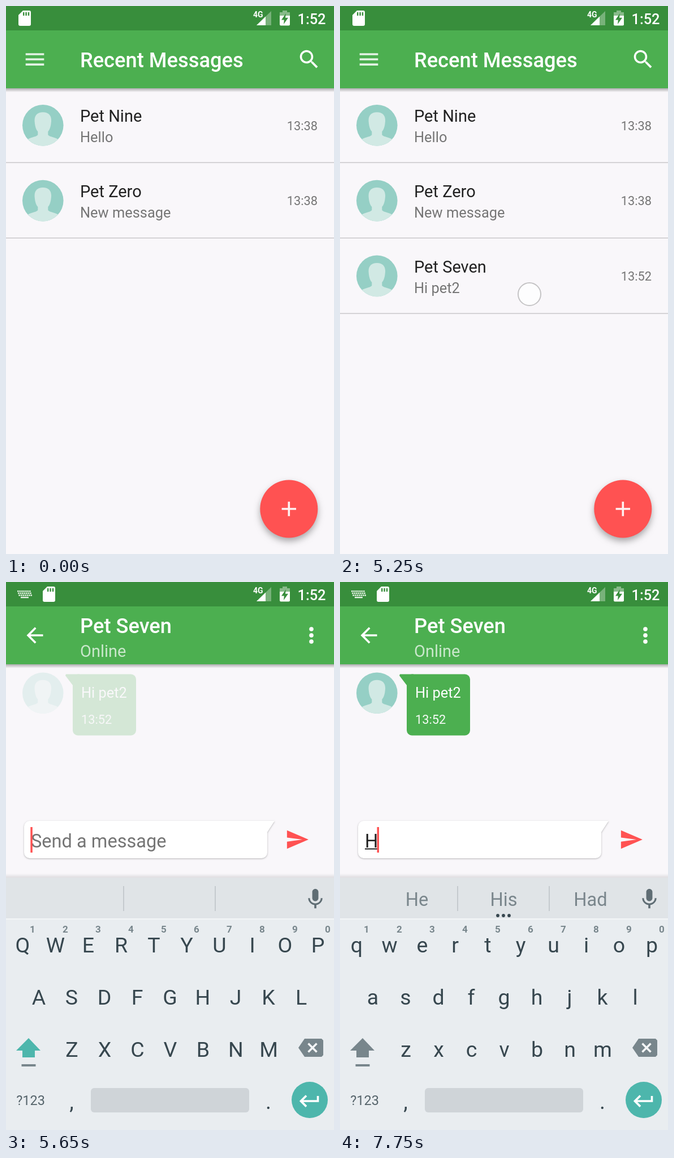
Recreate the animation shown at these times as an HTML page with a canvas. Size 580 by 966 pixels, loop 8000 ms.

```html
<!DOCTYPE html>
<html lang="en">
<head>
<meta charset="utf-8">
<title>Messages</title>
<style>
html, body { margin: 0; width: 100%; height: 100%; overflow: hidden; background: #f9f7fa; }
canvas { display: block; width: 580px; height: 966px; }
</style>
</head>
<body>
<canvas id="stage" width="580" height="966"></canvas>
<script>
const W = 580, H = 966, LOOP = 8000, STEP = 50;
const DP = 1.8125;
const BG = '#f9f7fa', GREEN = '#4caf50', DARK = '#388e3c', RED = '#ff5252', TEAL = '#4db6ac';
const KEY = '#37474f', MUTED = '#78868c';

const ICONS = {
  menu: 'M3 18h18v-2H3v2zm0-5h18v-2H3v2zm0-7v2h18V6H3z',
  search: 'M15.5 14h-.79l-.28-.27C15.41 12.59 16 11.11 16 9.5 16 5.91 13.09 3 9.5 3S3 5.91 3 9.5 5.91 16 9.5 16c1.61 0 3.09-.59 4.23-1.57l.27.28v.79l5 4.99L20.49 19l-4.99-5zm-6 0C7.01 14 5 11.99 5 9.5S7.01 5 9.5 5 14 7.01 14 9.5 11.99 14 9.5 14z',
  back: 'M20 11H7.83l5.59-5.59L12 4l-8 8 8 8 1.41-1.41L7.83 13H20v-2z',
  add: 'M19 13h-6v6h-2v-6H5v-2h6V5h2v6h6v2z',
  send: 'M2.01 21L23 12 2.01 3 2 10l15 2-15 2z',
  mic: 'M12 14c1.66 0 3-1.34 3-3V5c0-1.66-1.34-3-3-3S9 3.34 9 5v6c0 1.66 1.34 3 3 3zm5.3-3c0 3-2.54 5.1-5.3 5.1S6.7 14 6.7 11H5c0 3.41 2.72 6.23 6 6.72V21h2v-3.28c3.28-.48 6-3.3 6-6.72h-1.7z',
  enter: 'M19 7v4H5.83l3.58-3.59L8 6l-6 6 6 6 1.41-1.41L5.83 13H21V7z'
};

const rows = [
  { name: 'Pet Nine', text: 'Hello', time: '13:38' },
  { name: 'Pet Zero', text: 'New message', time: '13:38' },
  { name: 'Pet Seven', text: 'Hi pet2', time: '13:52' }
];

const screen = document.getElementById('stage').getContext('2d');
let g = screen;

const clamp = v => Math.max(0, Math.min(1, v));
const progress = (t, start, length) => clamp((t - start) / length);
const decelerate = (p, power) => 1 - Math.pow(1 - p, power);
const smooth = p => 0.5 - 0.5 * Math.cos(Math.PI * p);

function rect(x, y, w, h, color) {
  g.fillStyle = color;
  g.fillRect(x, y, w, h);
}

function round(x, y, w, h, r, color) {
  g.fillStyle = color;
  g.beginPath();
  g.roundRect(x, y, w, h, r);
  g.fill();
}

function disc(x, y, r, color) {
  g.fillStyle = color;
  g.beginPath();
  g.arc(x, y, r, 0, 7);
  g.fill();
}

function poly(color, ...pts) {
  g.fillStyle = color;
  g.beginPath();
  for (let i = 0; i < pts.length; i += 2) g.lineTo(pts[i], pts[i + 1]);
  g.closePath();
  g.fill();
}

function text(str, x, y, size, color, weight = 400, align = 'left') {
  g.font = `${weight} ${size}px Roboto, sans-serif`;
  g.fillStyle = color;
  g.textAlign = align;
  g.fillText(str, x, y);
}

// Icons live on a 24-unit grid; cx, cy is the grid centre.
function icon(name, cx, cy, color) {
  g.save();
  g.translate(cx - 12 * DP, cy - 12 * DP);
  g.scale(DP, DP);
  g.fillStyle = color;
  g.fill(new Path2D(ICONS[name]));
  g.restore();
}

function shadow(y, h, strength, up) {
  const fill = g.createLinearGradient(0, up ? y + h : y, 0, up ? y : y + h);
  fill.addColorStop(0, `rgba(0,0,0,${strength})`);
  fill.addColorStop(1, 'rgba(0,0,0,0)');
  rect(0, y, W, h, fill);
}

// Draws a group as one layer with shared opacity and vertical shift.
const spare = document.createElement('canvas').getContext('2d');
const spareInner = document.createElement('canvas').getContext('2d');
for (const c of [spare, spareInner]) {
  c.canvas.width = W;
  c.canvas.height = H;
}
function layer(alpha, dy, draw) {
  if (alpha <= 0) return;
  const parent = g;
  g = parent === screen ? spare : spareInner;
  g.clearRect(0, 0, W, H);
  draw();
  const done = g.canvas;
  g = parent;
  g.globalAlpha = alpha;
  g.drawImage(done, 0, dy);
  g.globalAlpha = 1;
}

function avatar(cx, cy) {
  g.save();
  g.translate(cx, cy);
  disc(0, 0, 36.3, '#95cfc5');
  g.beginPath();
  g.arc(0, 0, 36.3, 0, 7);
  g.clip();
  g.fillStyle = '#d1e9e4';
  g.beginPath();
  g.moveTo(0, -23);
  g.bezierCurveTo(11, -23, 16, -16, 14.5, -5);
  g.bezierCurveTo(14, 2, 12, 8, 9, 11);
  g.lineTo(9, 17);
  g.bezierCurveTo(12, 21, 24, 21, 30, 27);
  g.lineTo(30, 40);
  g.lineTo(-30, 40);
  g.lineTo(-30, 27);
  g.bezierCurveTo(-24, 21, -12, 21, -9, 17);
  g.lineTo(-9, 11);
  g.bezierCurveTo(-12, 8, -14, 2, -14.5, -5);
  g.bezierCurveTo(-16, -16, -11, -23, 0, -23);
  g.fill();
  g.restore();
}

function bars() {
  shadow(145, 7, 0.3);
  rect(0, 0, W, 43, DARK);
  rect(0, 43, W, 102, GREEN);
}

function row(i) {
  const { name, text: line, time } = rows[i], y = i * 132.8;
  avatar(65.3, 210.3 + y);
  text(name, 131, 204 + y, 29, '#212121');
  text(line, 131, 240 + y, 25.4, '#757575');
  text(time, 551, 218.5 + y, 21.75, '#757575', 400, 'right');
}

function listScene(t) {
  rect(0, 0, W, H, BG);
  bars();
  icon('menu', 51, 94, 'rgba(255,255,255,.85)');
  text('Recent Messages', 131, 108, 36.25, '#fff', 500);
  icon('search', 536, 94, '#fff');
  const shown = t < 1900 ? 2 : 3;
  for (let i = 0; i < shown; i++) {
    rect(0, Math.round(275.3 + i * 132.8), W, 2, '#d5d3d6');
    if (i < 2) row(i);
  }
  layer(smooth(progress(t, 1900, 120)), 0, () => row(2));

  g.save();
  g.shadowColor = 'rgba(0,0,0,.32)';
  g.shadowBlur = 12;
  g.shadowOffsetY = 6;
  disc(500.3, 886.5, 51, RED);
  g.restore();
  icon('add', 500.3, 886.5, 'rgba(255,255,255,.92)');

  if (t >= 5150) {
    disc(335, 508, 20, 'rgba(255,255,255,.75)');
    g.strokeStyle = 'rgba(0,0,0,.22)';
    g.lineWidth = 2;
    g.stroke();
  }
}

function bubble() {
  avatar(65.3, 195.7);
  round(118, 162.5, 112, 108, 9, GREEN);
  poly(GREEN, 106, 162.5, 130, 162.5, 130, 186, 118, 186, 118, 182, 105, 165);
  text('Hi pet2', 133, 204, 25.4, '#fff');
  text('13:52', 133, 250, 21.75, 'rgba(255,255,255,.95)');
}

function inputShape() {
  g.beginPath();
  g.moveTo(42, 421);
  g.lineTo(475, 421);
  g.lineTo(462, 441);
  g.arcTo(462, 487, 452, 487, 10);
  g.arcTo(32, 487, 32, 477, 10);
  g.arcTo(32, 421, 42, 421, 10);
  g.closePath();
}

function inputBox(t) {
  const typed = t >= 7600;
  g.save();
  g.shadowColor = 'rgba(0,0,0,.28)';
  g.shadowBlur = 3;
  g.shadowOffsetY = 1;
  g.fillStyle = '#fff';
  inputShape();
  g.fill();
  g.restore();
  if (typed) {
    text('H', 44, 467.5, 32.6, '#212121');
    rect(44, 469.5, 22, 2, '#212121');
  } else {
    text('Send a message', 44, 467.5, 32.6, '#757575');
  }
  const lit = Math.floor((t - 5300) / 500) % 2 === 0;
  if (typed || lit) rect(typed ? 65.5 : 43.3, 432, 3.5, 45, RED);
  icon('send', 515, 454, RED);
}

function chatScene(t) {
  rect(0, 0, W, H, BG);
  bars();
  if (t >= 5450) {
    icon('back', 51, 94, '#fff');
    text('Pet Seven', 131, 90, 36.25, '#fff', 500);
    text('Online', 131, 131.5, 29, 'rgba(255,255,255,.7)');
    for (const y of [83, 94, 105]) disc(540, y, 3.8, '#fff');
  }
  layer(smooth(progress(t, 5605, 150)), 0, bubble);
  g.save();
  if (t < 5400) g.translate(0, 445);
  inputBox(t);
  g.restore();
}

function keyRow(letters, x, y) {
  [...letters].forEach((c, i) => text(c, x + i * 58, y, 37.5, KEY, 400, 'center'));
}

function keyboard(t) {
  const lower = t >= 7650;
  const cased = s => lower ? s.toLowerCase() : s;
  shadow(514, 7, 0.1, true);
  rect(0, 521, W, 445, '#e9edf0');
  rect(0, 521, W, 72, '#e0e4e7');
  rect(0, 593, W, 2, '#f3f5f7');
  rect(207, 536, 2, 44, '#c5cace');
  rect(369, 536, 2, 44, '#c5cace');
  icon('mic', 547, 559, '#5f6d74');
  if (t >= 7700) {
    ['He', 'His', 'Had'].forEach((s, i) => text(s, 136 + i * 153.5, 571, 32.6, '#7a868c', 400, 'center'));
    for (const x of [279, 289, 299]) disc(x, 588, 2.9, KEY);
  }

  keyRow(cased('QWERTYUIOP'), 29.5, 652.5);
  keyRow(cased('ASDFGHJKL'), 58, 744.5);
  keyRow(cased('ZXCVBNM'), 116.5, 836.5);
  [...'1234567890'].forEach((c, i) => text(c, 47 + i * 58, 618, 17, MUTED, 700, 'center'));

  poly(lower ? MUTED : TEAL, 40, 804, 61, 826, 51, 826, 51, 838, 29, 838, 29, 826, 18, 826);
  rect(27.5, 850, 25, 4, MUTED);

  poly(MUTED, 517, 821, 528, 805, 558, 805, 561, 808, 561, 834, 558, 837, 528, 837);
  g.strokeStyle = '#f4f6f7';
  g.lineWidth = 3.6;
  g.beginPath();
  for (const d of [-7.5, 7.5]) {
    g.moveTo(542 - d, 813.5);
    g.lineTo(542 + d, 828.5);
  }
  g.stroke();

  text('?123', 43.5, 922, 23.5, '#56646b', 400, 'center');
  text(',', 116, 929, 38, KEY, 400, 'center');
  text('.', 464, 929, 38, KEY, 400, 'center');
  round(150, 892, 280, 43, 6, '#cfd4d8');
  disc(537, 913, 32, TEAL);
  icon('enter', 537, 915, '#fff');
}

function sdCard(x) {
  g.fillStyle = '#fff';
  g.beginPath();
  g.moveTo(x + 8, 8);
  g.arcTo(x + 22, 8, x + 22, 11, 3);
  g.arcTo(x + 22, 35, x + 19, 35, 3);
  g.arcTo(x, 35, x, 32, 3);
  g.lineTo(x, 16);
  g.closePath();
  g.fill();
  for (const d of [8, 12.4, 16.8]) rect(x + d, 11, 2.4, 6, DARK);
}

function statusIcons(chat) {
  sdCard(chat ? 65 : 22);
  if (chat) {
    for (let r = 0; r < 3; r++)
      for (let i = 0; i < 7; i++) rect(20 + r * 1.2 + i * 3.5, 15 + r * 3.6, 2.6, 2.5, '#e4f0e4');
    rect(26, 26, 14, 2.4, '#e4f0e4');
  }
  text('4G', 437, 20, 14, '#fff', 700);
  poly('rgba(255,255,255,.32)', 443, 34, 469, 34, 469, 9);
  poly('#fff', 443, 34, 459, 34, 459, 18.5);

  rect(489, 8, 8, 3, 'rgba(255,255,255,.4)');
  rect(484, 11, 18, 6, 'rgba(255,255,255,.4)');
  round(484, 17, 18, 17.5, [0, 0, 2, 2], '#fff');
  poly(DARK, 495, 13, 487, 24.5, 491.8, 24.5, 491, 32, 499, 20.8, 494, 20.8);
  text('1:52', 515.5, 31.5, 25.4, '#fff', 500);
}

function draw(t) {
  const open = t - 5270;
  const slide = 77 * (1 - decelerate(clamp(open / 350), 5));
  const alpha = decelerate(clamp(open / 200), 4);
  if (alpha < 1) listScene(t);
  if (open > 0) {
    // Keeps the strip above the sliding window dark.
    layer(alpha, slide, () => chatScene(t));
    if (slide > 0.5) rect(0, 0, W, slide, DARK);
    const rise = decelerate(progress(t, 5400, 200), 2);
    layer(progress(t, 5400, 120), 130 * (1 - rise), () => keyboard(t));
  }
  statusIcons(t >= 5300);
}

function tick(now) {
  draw(Math.floor(now % LOOP / STEP) * STEP);
  requestAnimationFrame(tick);
}
draw(0);
const start = performance.now();
requestAnimationFrame(function loop(now) {
  tick(Math.max(0, now - start));
  tick = stamp => draw(Math.floor(Math.max(0, stamp - start) % LOOP / STEP) * STEP) || requestAnimationFrame(tick);
});
</script>
</body>
</html>
```
